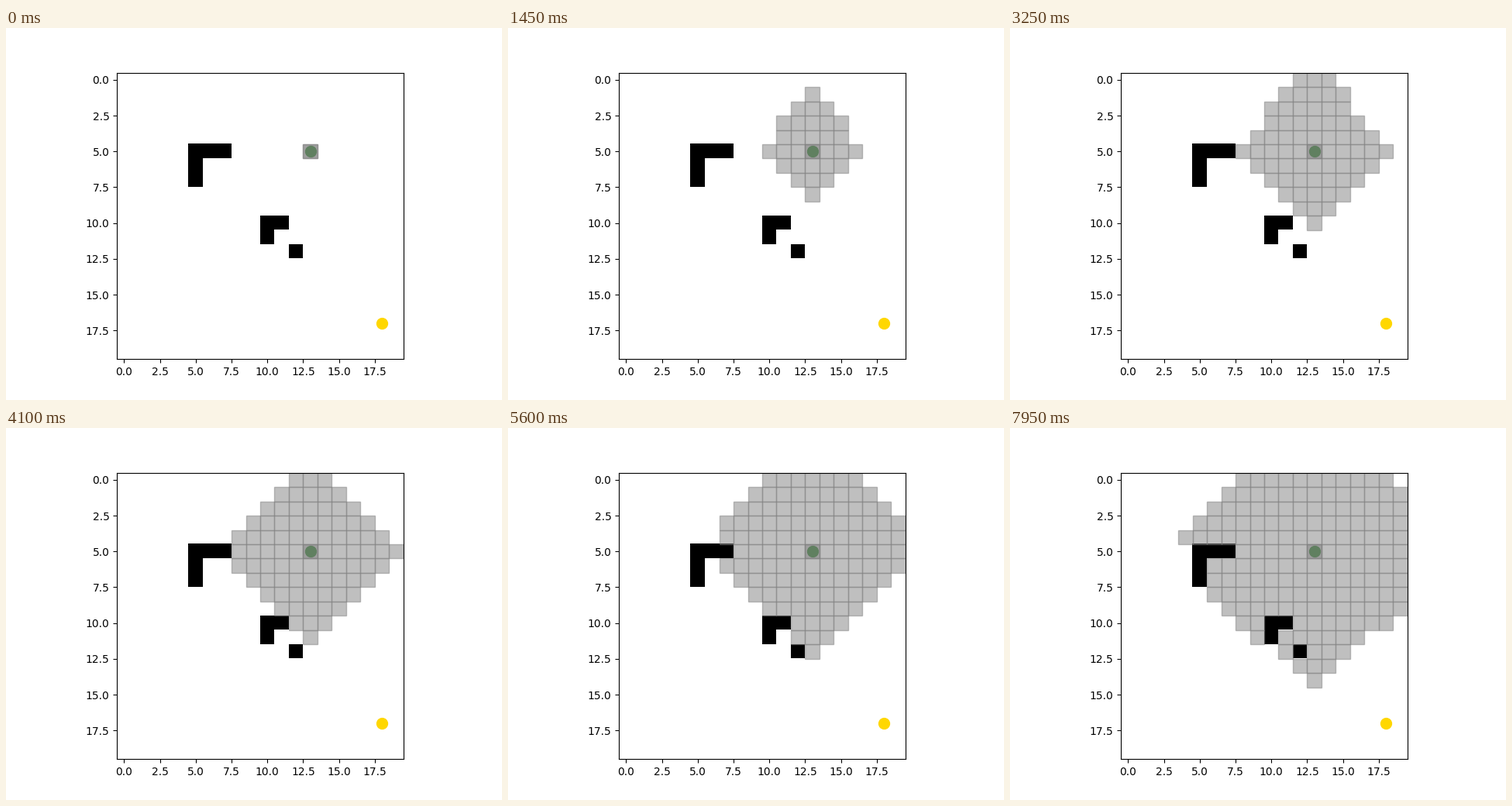
Write a matplotlib script that moves like this. It is 640 px wide and 480 px high and loops after 8 s.

```python
import numpy as np
import matplotlib.pyplot as plt
from matplotlib.animation import FuncAnimation
from matplotlib.patches import Rectangle

SIZE = 20
START = (5, 13)   # (row, column)
GOAL = (17, 18)
WALLS = [(5, 5), (5, 6), (5, 7), (6, 5), (7, 5),
         (10, 10), (10, 11), (11, 10), (12, 12)]
FRAMES = 160
INTERVAL = 50


def search_order(grid, start):
    """Cells in order of path length, then row, then column."""
    order, level, seen = [], [start], {start}
    while level:
        order += level
        following = set()
        for r, c in level:
            for cell in ((r - 1, c), (r + 1, c), (r, c - 1), (r, c + 1)):
                inside = 0 <= cell[0] < SIZE and 0 <= cell[1] < SIZE
                if inside and cell not in seen and not grid[cell]:
                    following.add(cell)
        seen |= following
        level = sorted(following)
    return order


def add_tile(cell):
    row, col = cell
    tile = Rectangle((col - 0.5, row - 0.5), 1, 1, color="gray", alpha=0.5)
    return ax.add_patch(tile)


def add_dot(cell, color):
    ax.plot(cell[1], cell[0], "o", color=color, markersize=10, zorder=1)


grid = np.zeros((SIZE, SIZE))
for wall in WALLS:
    grid[wall] = 1

fig, ax = plt.subplots(figsize=(6.4, 4.8), dpi=100)
ax.imshow(grid, cmap="binary")
add_dot(START, "green")
add_dot(GOAL, "gold")
ax.set_xlim(-0.5, SIZE - 0.5)
ax.set_ylim(SIZE - 0.5, -0.5)

add_tile(START)  # the start cell is shaded twice
tiles = [add_tile(cell) for cell in search_order(grid, START)[:FRAMES]]


def update(frame):
    for i, tile in enumerate(tiles):
        tile.set_visible(i <= frame)
    return tiles


anim = FuncAnimation(fig, update, frames=FRAMES, interval=INTERVAL,
                     repeat=True, repeat_delay=0, blit=False)
plt.show()
```
